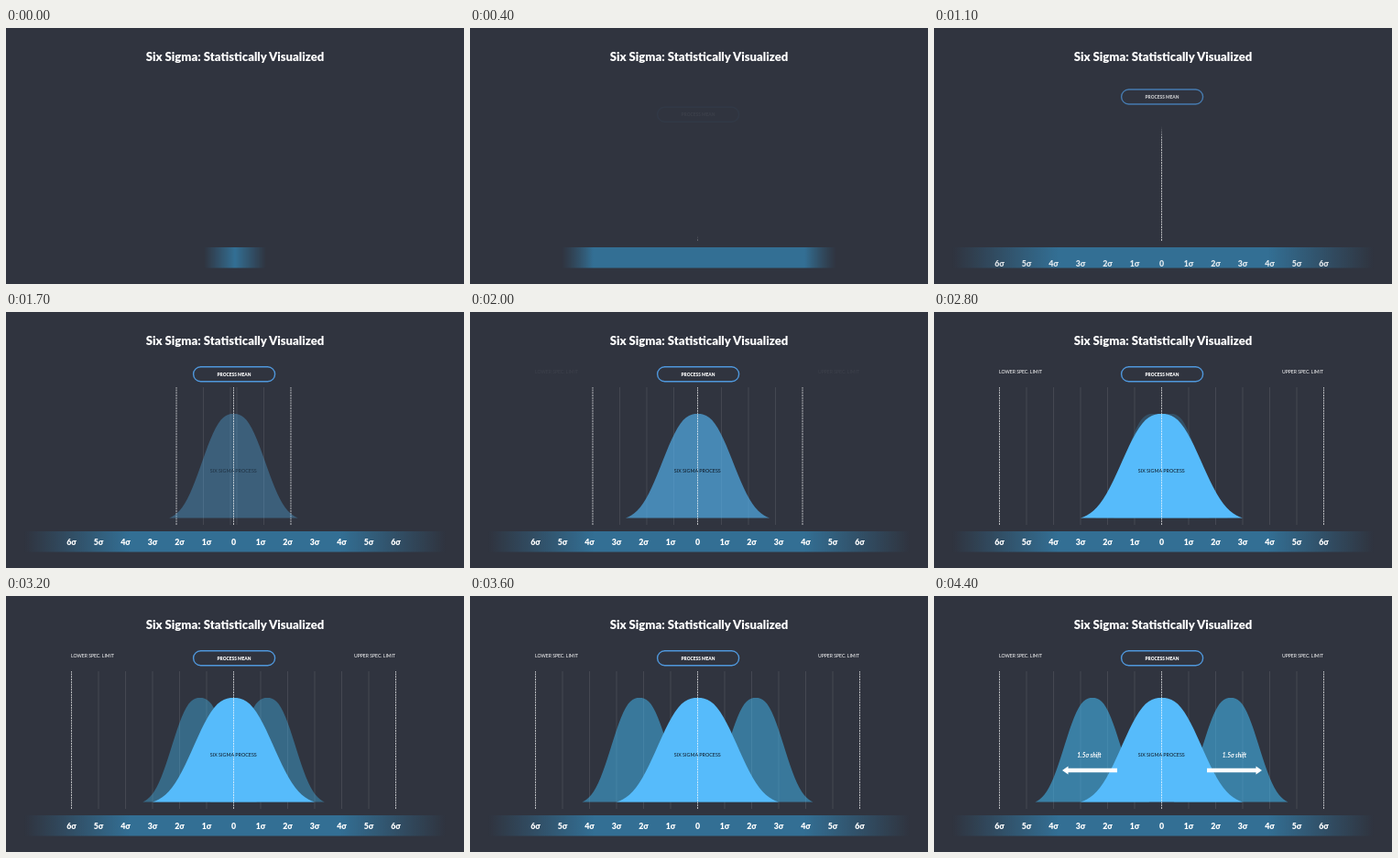
An HTML page that plays this animation: 500x279 px, repeating every 5300 ms.

```html
<!DOCTYPE html>
<html lang="en">
<head>
<meta charset="utf-8">
<title>Six Sigma: Statistically Visualized</title>
<style>
  html, body { margin: 0; width: 100%; height: 100%; overflow: hidden; background: #30343f; }
  svg { display: block; width: 100%; height: 100%; }
  text { font-family: Lato, "Open Sans", sans-serif; fill: #fff; text-anchor: middle; }
  .bold { font-weight: 900; }
  .bright { stroke: #fff; stroke-width: .8; stroke-opacity: .85; stroke-dasharray: 2 .8; }
  .faint { stroke: #fff; stroke-opacity: .1; }
</style>
</head>
<body>
<svg viewBox="0 0 500 279">
  <defs>
    <linearGradient id="barFill" gradientUnits="userSpaceOnUse" x1="20" x2="480">
      <stop offset="0" stop-color="#336f94" stop-opacity="0"/>
      <stop offset=".25" stop-color="#336f94"/>
      <stop offset=".75" stop-color="#336f94"/>
      <stop offset="1" stop-color="#336f94" stop-opacity="0"/>
    </linearGradient>
    <linearGradient id="barWipe" gradientUnits="userSpaceOnUse">
      <stop stop-color="#fff" stop-opacity="0"/>
      <stop class="inner" stop-color="#fff"/>
      <stop class="inner" stop-color="#fff"/>
      <stop offset="1" stop-color="#fff" stop-opacity="0"/>
    </linearGradient>
    <mask id="barMask" maskUnits="userSpaceOnUse" x="0" y="230" width="500" height="40">
      <rect y="230" width="500" height="40" fill="url(#barWipe)"/>
    </mask>
    <linearGradient id="meanWipe" gradientUnits="userSpaceOnUse" x1="0" y1="0" x2="0" y2="16">
      <stop stop-color="#fff" stop-opacity="0"/>
      <stop offset="1" stop-color="#fff"/>
    </linearGradient>
    <linearGradient id="arrowWipe" gradientUnits="userSpaceOnUse" x1="-8" x2="0">
      <stop stop-color="#fff"/>
      <stop offset="1" stop-color="#fff" stop-opacity="0"/>
    </linearGradient>
    <path id="arrow" d="M49.5 187.8H103V185.5L109.5 190L103 194.5V192.2H49.5Z" fill="url(#arrowWipe)"/>
  </defs>

  <text class="bold" x="250" y="35.5" font-size="13.1">Six Sigma: Statistically Visualized</text>
  <rect x="20" y="239" width="460" height="22.5" fill="url(#barFill)" mask="url(#barMask)"/>
  <g id="labels" class="bold" font-size="8.8"></g>
  <g id="lines"></g>

  <g id="limits" font-size="5.1">
    <text x="71" y="67" style="text-anchor:start">LOWER SPEC. LIMIT</text>
    <text x="425" y="67" style="text-anchor:end">UPPER SPEC. LIMIT</text>
  </g>

  <path id="leftCurve" fill="#44bbf4"/>
  <path id="rightCurve" fill="#44bbf4"/>
  <path id="mainCurve" fill="#56bbfb"/>
  <path d="M248.5 232V82" class="bright" style="stroke:url(#meanWipe)"/>
  <text id="processName" x="248.3" y="175" font-size="5.4" style="fill:#0e1722">SIX SIGMA PROCESS</text>

  <g id="pill">
    <rect x="204.6" y="59.8" width="89" height="15.9" rx="7.95" fill="none" stroke="#4f97dc" stroke-width="1.4"/>
    <text class="bold" x="249" y="69.8" font-size="4.8">PROCESS MEAN</text>
  </g>

  <use href="#arrow" transform="translate(248.5)"/>
  <use href="#arrow" transform="translate(249.5) scale(-1 1)"/>
  <g id="shiftText" font-weight="700" font-style="italic" font-size="6.5">
    <text x="169.5" y="176">1.5σ shift</text>
    <text x="328" y="176">1.5σ shift</text>
  </g>
</svg>
<script>
const MEAN = 248.5, SIGMA = 29.5, LOOP = 5300;
const $ = id => document.getElementById(id);
const progress = (t, start, end) => Math.min(1, Math.max(0, (t - start) / (end - start)));

function add(parent, tag, attrs, text = '') {
  const node = document.createElementNS('http://www.w3.org/2000/svg', tag);
  set(node, attrs);
  node.textContent = text;
  return $(parent).appendChild(node);
}
function set(node, attrs) {
  for (const name in attrs) node.setAttribute(name, attrs[name]);
}

// Flat-topped bell curve of unit height whose foot reaches zero at u = ±1.
const hump = u => Math.exp(-((Math.abs(u) / .6) ** 2.55));
const bell = u => (hump(u) - hump(1)) / (1 - hump(1));
function bellPath(center, halfWidth) {
  let d = '';
  for (let u = -1; u <= 1.001; u += .04)
    d += `${d ? 'L' : 'M'}${(center + u * halfWidth).toFixed(2)} ${(224.5 - 113.5 * bell(u)).toFixed(2)}`;
  return d + 'Z';
}

const lines = [];
for (let k = -6; k <= 6; k++) {
  add('labels', 'text', { x: MEAN + k * SIGMA, y: 254 }, k ? Math.abs(k) + 'σ' : '0');
  if (k) lines.push({ k, node: add('lines', 'path', { class: Math.abs(k) === 6 ? 'bright' : 'faint' }) });
}

function drawBar(t) {
  const half = 34 + .29 * t, soft = 17 / half;
  set($('barWipe'), { x1: 250 - half, x2: 250 + half });
  const [left, right] = document.querySelectorAll('.inner');
  set(left, { offset: soft });
  set(right, { offset: 1 - soft });
}

function drawLines(t) {
  const hidden = 6 * SIGMA * (1 - progress(t, 1340, 2360));
  for (const { k, node } of lines) {
    const distance = Math.abs(k) * SIGMA - hidden;
    set(node, {
      d: `M${MEAN + Math.sign(k) * distance} 232V82`,
      visibility: distance > 0 ? 'visible' : 'hidden'
    });
  }
}

function drawCurves(t) {
  const grow = progress(t, 1400, 2360);
  set($('mainCurve'), { d: bellPath(MEAN, 88.5 * (.7 + .3 * grow)), opacity: grow });
  set($('processName'), { opacity: Math.min(1, 2 * grow) });

  const slide = progress(t, 2650, 3780);
  const opacity = .555 * Math.sqrt(slide);
  set($('leftCurve'), { d: bellPath(MEAN - 75.5 * slide, 62.5), opacity });
  set($('rightCurve'), { d: bellPath(MEAN + 75.5 * slide, 62.5), opacity });
}

function draw(t) {
  drawBar(t);
  drawLines(t);
  drawCurves(t);

  const pillDrop = Math.min(26.5, Math.max(0, 26.5 - .0275 * (t - 400)));
  set($('pill'), { transform: `translate(0 ${pillDrop})`, opacity: progress(t, 350, 1400) });
  set($('meanWipe'), { gradientTransform: `translate(0 ${Math.max(60, 226 - .17 * (t - 400))})` });

  const rise = progress(t, 850, 1300);
  set($('labels'), { transform: `translate(0 ${13.5 * (1 - rise)})`, opacity: Math.min(1, rise * 1.5) });
  set($('limits'), { opacity: progress(t, 1950, 2800) });

  const shift = progress(t, 3700, 4400);
  set($('arrowWipe'), { gradientTransform: `translate(${49.5 + 68.5 * shift})` });
  set($('shiftText'), { opacity: shift });
}

// The picture advances in tenths of a second, with one pause at 2.4 s.
function frame(now) {
  const step = Math.floor(now % LOOP / 100);
  draw(100 * (step === 25 ? 24 : Math.min(step, 44)));
  requestAnimationFrame(frame);
}
draw(0);
requestAnimationFrame(frame);
</script>
</body>
</html>
```
